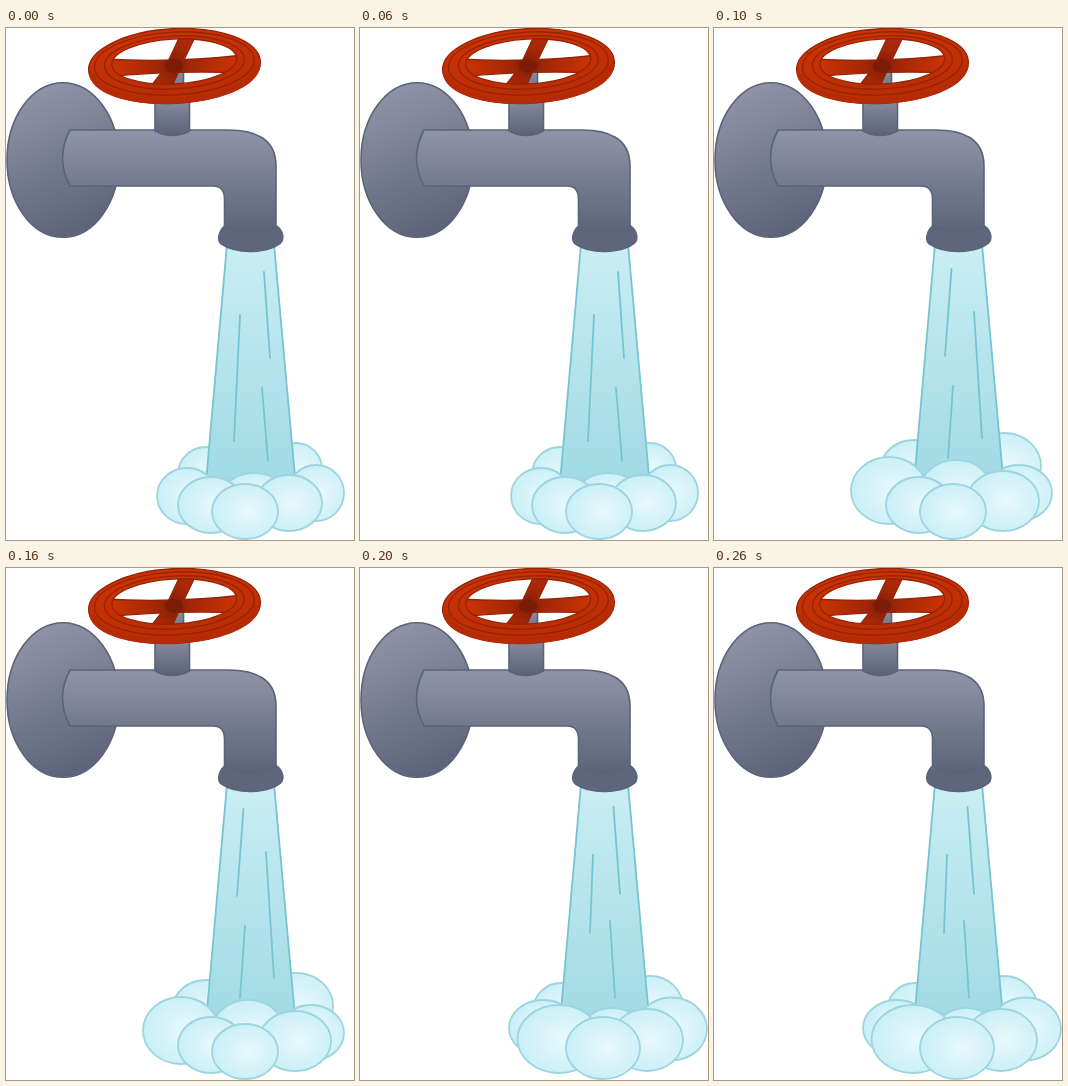
These frames come from a looping animation (348 px wide and 512 px high, 300 ms). An HTML page:

```html
<!DOCTYPE html>
<html lang="en">
<head>
<meta charset="utf-8">
<title>Running tap</title>
<style>
  html, body { margin: 0; width: 100%; height: 100%; overflow: hidden; background: #fff; }
  svg { display: block; width: 348px; height: 512px; }
  .metal { stroke: #59647a; stroke-width: 1.6; stroke-linejoin: round; }
  .jet { fill: url(#water); stroke: #76c4d1; stroke-width: 1.8; }
  .streaks { fill: none; stroke: #76c4d1; stroke-width: 1.8; stroke-linecap: round; }
  .foam { fill: url(#bubble); stroke: #9ed4df; stroke-width: 1.8; }
  .pose { visibility: hidden; animation: show .3s step-end infinite; }
  .pose:nth-of-type(2) { animation-delay: -.2s; }
  .pose:nth-of-type(3) { animation-delay: -.1s; }
  @keyframes show {
    0% { visibility: visible; }
    33.3333%, 100% { visibility: hidden; }
  }
</style>
</head>
<body>
<svg viewBox="0 0 348 512">
  <defs>
    <linearGradient id="steel" x2="0" y2="1">
      <stop stop-color="#9094a6"/><stop offset="1" stop-color="#5b6277"/>
    </linearGradient>
    <linearGradient id="plate" x1=".35" x2=".65" y2="1">
      <stop stop-color="#9094a6"/><stop offset="1" stop-color="#5b6277"/>
    </linearGradient>
    <linearGradient id="water" x2="0" y2="1">
      <stop stop-color="#caeef4"/><stop offset="1" stop-color="#9fd9e4"/>
    </linearGradient>
    <radialGradient id="bubble" cx=".56" cy=".5" r=".55">
      <stop stop-color="#e9f9fc"/><stop offset="1" stop-color="#c8eff6"/>
    </radialGradient>
    <linearGradient id="rim" x1=".4" x2=".6" y2="1">
      <stop stop-color="#cc3304"/><stop offset="1" stop-color="#b82c05"/>
    </linearGradient>
    <radialGradient id="spoke" gradientUnits="userSpaceOnUse" cx="168" cy="38" r="60">
      <stop stop-color="#7c1c06"/><stop offset=".3" stop-color="#a42707"/><stop offset="1" stop-color="#c93204"/>
    </radialGradient>
    <path id="jet" class="jet" d="M221 216 L199.500 460 H290 L268 216Z"/>
  </defs>

  <g class="pose">
    <g class="foam">
      <ellipse cx="200" cy="446" rx="28" ry="27"/>
      <ellipse cx="290" cy="441" rx="26" ry="26"/>
    </g>
    <use href="#jet"/>
    <path class="streaks" d="M234 287 L228 413 M258 244 L264 330 M256 360 L262 433"/>
    <g class="foam">
      <ellipse cx="181" cy="468" rx="30" ry="28"/>
      <ellipse cx="310" cy="465" rx="28" ry="28"/>
      <ellipse cx="248" cy="470" rx="33" ry="25"/>
      <ellipse cx="205" cy="477" rx="33" ry="28"/>
      <ellipse cx="283" cy="475" rx="33" ry="28"/>
      <ellipse cx="239" cy="483.500" rx="33" ry="27.500"/>
    </g>
  </g>
  <g class="pose">
    <g class="foam">
      <ellipse cx="200" cy="440" rx="33" ry="28"/>
      <ellipse cx="290" cy="438" rx="37" ry="33"/>
    </g>
    <use href="#jet"/>
    <path class="streaks" d="M237.500 241 L231 328 M260 284 L268 410 M239 358 L234 430"/>
    <g class="foam">
      <ellipse cx="175" cy="462.500" rx="38" ry="33.500"/>
      <ellipse cx="305" cy="465" rx="33" ry="28"/>
      <ellipse cx="242" cy="465" rx="37" ry="33"/>
      <ellipse cx="205" cy="477" rx="33" ry="28"/>
      <ellipse cx="289" cy="473" rx="36" ry="30"/>
      <ellipse cx="239" cy="483.500" rx="33" ry="27.500"/>
    </g>
  </g>
  <g class="pose">
    <g class="foam">
      <ellipse cx="201" cy="443" rx="28" ry="28"/>
      <ellipse cx="290" cy="439" rx="33" ry="31"/>
    </g>
    <use href="#jet"/>
    <path class="streaks" d="M233 287 L230 365 M253.500 239 L260 326 M250 353 L255 430"/>
    <g class="foam">
      <ellipse cx="183" cy="460" rx="34" ry="28"/>
      <ellipse cx="311.500" cy="461" rx="35.500" ry="31.500"/>
      <ellipse cx="252" cy="468" rx="33" ry="28"/>
      <ellipse cx="199" cy="471" rx="41.500" ry="34"/>
      <ellipse cx="287" cy="472" rx="36" ry="31"/>
      <ellipse cx="243" cy="480" rx="37" ry="31"/>
    </g>
  </g>

  <g class="metal" fill="url(#steel)">
    <ellipse cx="57" cy="132" rx="56" ry="77.300" fill="url(#plate)"/>
    <path d="M64 102 H222 C254 102 270 114 270 138 V208 H218.500 V170 Q218 158 207 158 H64 Q49 130 64 102Z"/>
    <path d="M149 64 V103 Q166 112 183.500 103 V64Z"/>
    <path d="M168 38 V74 H177.500 V38Z"/>
    <path fill="#5f667b" d="M218.500 198 C212 204 211 213 215.500 216 C230 226 260 226 274.500 215 C279 211 276.500 202 270.500 198 C258 206 232 206 218.500 198Z"/>
  </g>

  <g stroke="#952405" stroke-width="1.300" stroke-linejoin="round">
    <path fill="url(#spoke)" d="M174 8 L190 7 L177 34 Q172 46 164 62 H142 L159 40Z"/>
    <path fill="url(#spoke)" d="M98 31 Q168 35 238 27 V45 Q168 42 98 49Z"/>
    <g fill="none" transform="rotate(-3 168.500 38)">
      <path fill="url(#rim)" fill-rule="evenodd"
        d="M82.500 38 a86 37.300 0 0 1 172 0 a86 37.300 0 0 1 -172 0Z M106 33.500 a62.500 22.500 0 0 0 125 0 a62.500 22.500 0 0 0 -125 0Z"/>
      <path stroke="#b42b05" stroke-width="6" d="M85.500 42 C94 83 243 83 251.500 42"/>
      <ellipse cx="168.500" cy="35.500" rx="80" ry="31.500"/>
      <ellipse cx="168.500" cy="34.500" rx="70" ry="26.500"/>
    </g>
    <ellipse cx="168" cy="38" rx="9" ry="7" fill="#7c1c06" stroke="none"/>
  </g>
</svg>
</body>
</html>
```
